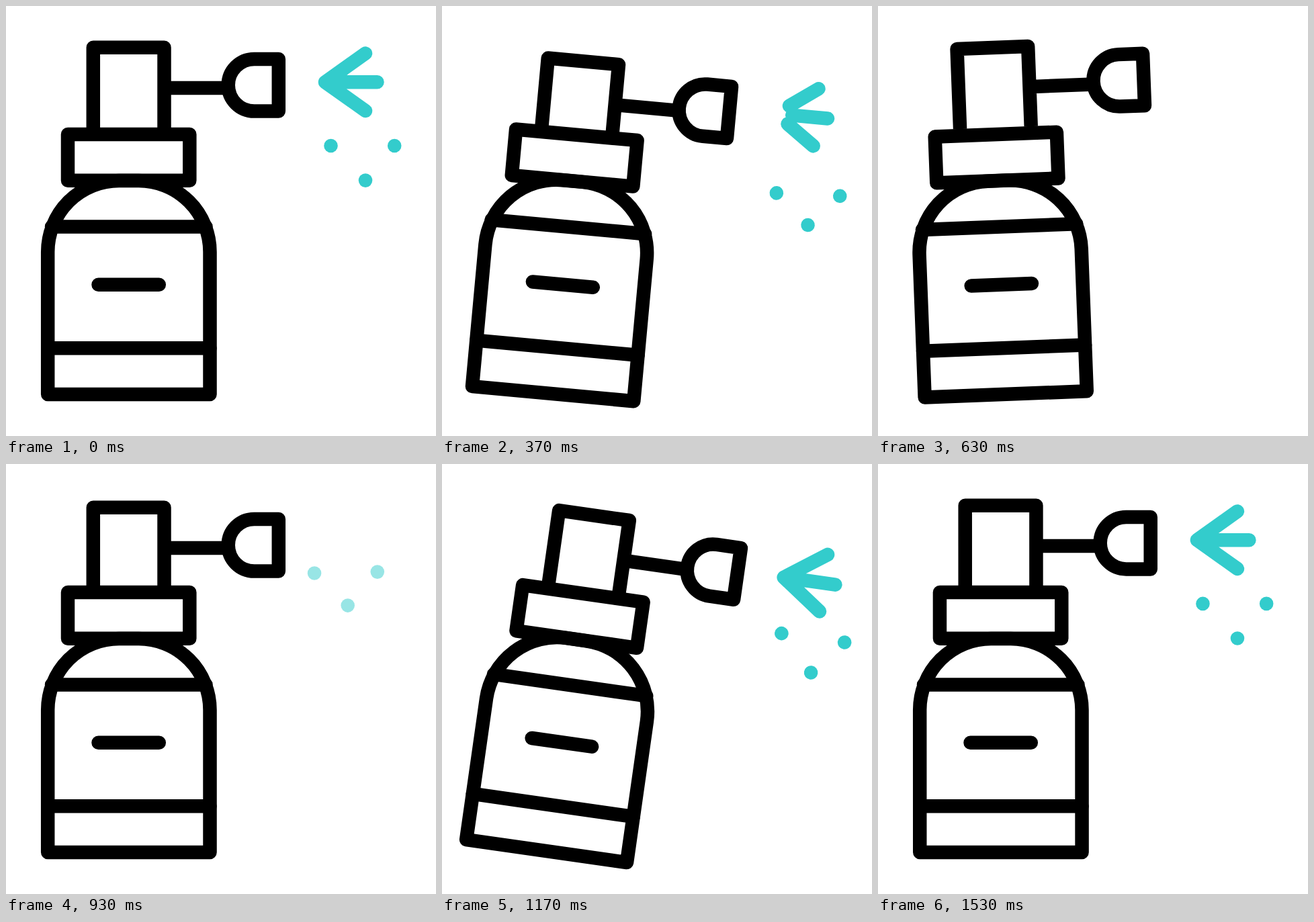
An HTML page that plays this animation: 640 by 640 pixels, repeating every 1670 ms.

```html
<!DOCTYPE html>
<html lang="en">
<head>
<meta charset="utf-8">
<title>Spray bottle</title>
<style>
  html, body { margin: 0; width: 100%; height: 100%; overflow: hidden; background: #fff; }
  svg { display: block; width: 100%; height: 100%; }
  path { fill: none; stroke: #000; stroke-width: 20.5; stroke-linejoin: round; }
  .round { stroke-linecap: round; }
  #arrow { stroke: #3cc; }
  circle { fill: #3cc; }
</style>
</head>
<body>
<svg viewBox="0 0 640 640">
  <g id="bottle">
    <g id="head">
      <path d="M129.8 181V61.8H235.5V181M235.5 122H331"/>
      <path d="M405.8 79V156.5H369.5A38.75 38.75 0 0 1 369.5 79Z"/>
      <path id="arrow" class="round"/>
    </g>
    <path d="M92 191H273.3V259.8H92Z"/>
    <path d="M62.2 578V366A106 106 0 0 1 168.2 260H197.5A106 106 0 0 1 303.5 366V578Z"/>
    <path class="round" d="M68 328.5H297.5M62.2 509.2H303.5M137.5 414.7H227.8"/>
    <g id="dots">
      <circle cx="483.5" cy="208" r="10.3"/>
      <circle cx="578.2" cy="208" r="10.3"/>
      <circle cx="535" cy="259.6" r="10.3"/>
    </g>
  </g>
</svg>
<script>
const LOOP = 1670, STEP = 33.4;
const $ = id => document.getElementById(id);
const bottle = $('bottle'), head = $('head'), arrow = $('arrow'), dots = $('dots');
const TIP = [475, 113.3];
const RAYS = [[535, 70.5], [552.5, 113.3], [535, 156]];

const clamp = v => Math.min(1, Math.max(0, v));
const ease = (n, from, to) => {
  const u = clamp((n - from) / (to - from));
  return u * u * (3 - 2 * u);
};

// Eased value through [step, value] keys
function track(n, keys) {
  let value = keys[0][1];
  for (let i = 1; i < keys.length; i++) {
    value += (keys[i][1] - keys[i - 1][1]) * ease(n, keys[i - 1][0], keys[i][0]);
  }
  return value;
}

const tilt = n => track(n, [
  [8, 0], [13, 8.1], [18.7, -2.2], [24, 0],
  [30, 0], [35, 8.1], [40.6, -2.2], [46.3, 0]
]);
const press = n => track(n, [
  [7, 0], [11, 19.3], [12, 19.3], [19, 0],
  [27, 0], [31, 19.3], [32, 19.3], [39, 0]
]);

// Rays retract away from the tip, then grow back out of it
function drawArrow(n) {
  const start = n < 20 ? ease(n, 8, 16) : 0;
  const end = n < 20 ? 1 : ease(n, 28, 34.5);
  const at = ([x, y], k) => `${TIP[0] + (x - TIP[0]) * k} ${TIP[1] + (y - TIP[1]) * k}`;
  arrow.setAttribute('d', end > start
    ? RAYS.map(ray => `M${at(ray, start)}L${at(ray, end)}`).join('') : '');
}

// Drops fall away one after another, then drift in from the nozzle
function drawDots(n) {
  dots.setAttribute('opacity', n < 20 ? 1 - clamp((n - 11) / 4) : clamp((n - 26) / 4));
  [...dots.children].forEach((dot, i) => {
    const fall = 12 * Math.max(0, n - 7.5 - 0.35 * i);
    const left = 1 - ease(n, 26 + 0.25 * i, 34 + 0.25 * i);
    const [x, y] = n < 20 ? [fall * 0.08, fall] : [-29 * left, -54 * left];
    dot.setAttribute('transform', `translate(${x} ${y})`);
  });
}

function draw(now) {
  const n = Math.floor((now % LOOP) / STEP + 0.2);
  bottle.setAttribute('transform', `rotate(${tilt(n)} 182.9 384.5)`);
  head.setAttribute('transform', `translate(0 ${press(n)})`);
  drawArrow(n);
  drawDots(n);
}

const began = performance.now();
function tick() {
  draw(performance.now() - began);
  requestAnimationFrame(tick);
}
tick();
</script>
</body>
</html>
```
